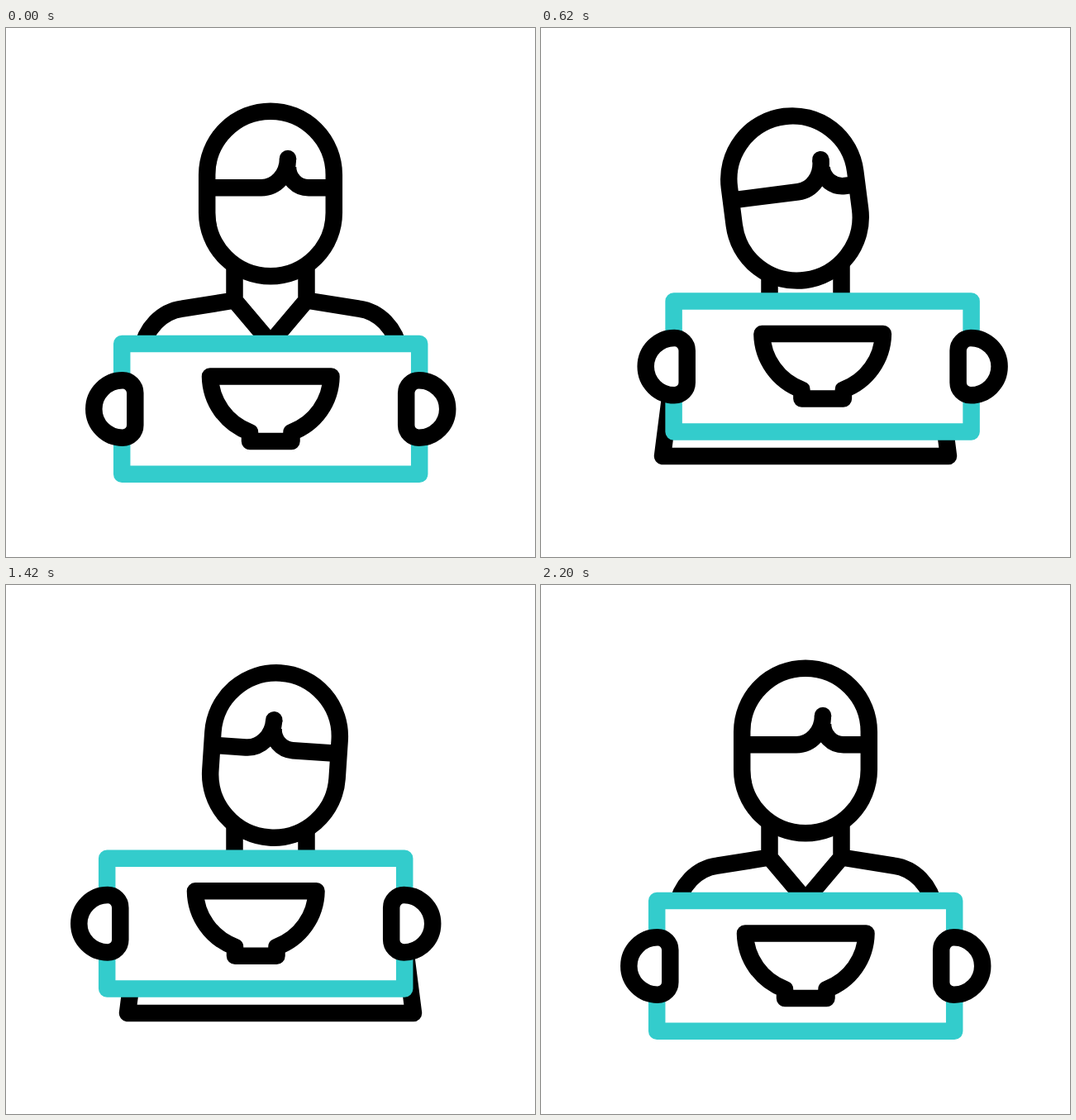
Write an HTML page that moves like this. It is 640x640 px and loops after 2400 ms.

```html
<!DOCTYPE html>
<html lang="en">
<head>
<meta charset="utf-8">
<title>Person holding a bowl sign</title>
<style>
  html, body { margin: 0; height: 100%; overflow: hidden; background: #fff; }
  svg { display: block; width: 100%; height: 100%; }
</style>
</head>
<body>
<svg viewBox="0 0 640 640" fill="#fff" stroke="#000" stroke-width="20.5" stroke-linejoin="round">
  <defs>
    <path id="hand" d="M141 426.3A34.7 34.7 0 0 0 141 495.7A15.3 15.3 0 0 0 156.3 480.4V441.6A15.3 15.3 0 0 0 141 426.3Z"/>
  </defs>

  <!-- body -->
  <path d="M276.5 329.5L213 339.7C189 343 169 362 163 393L147 518H493L477 393C471 362 451 343 427 339.7L363.5 329.5"/>
  <path d="M276.5 284V329.5L320 381L363.5 329.5V284"/>

  <g id="head">
    <rect x="243.2" y="100.7" width="153.6" height="199.6" rx="76.8"/>
    <path id="hair" fill="none"/>
    <circle id="tip" cy="158" r="10.25" fill="#000" stroke="none"/>
  </g>

  <g id="sign">
    <rect x="140.2" y="382" width="360" height="157.8" stroke="#33cccc"/>
    <use href="#hand"/>
    <use href="#hand" transform="translate(640.5) scale(-1 1)"/>
    <path d="M295 489A73.2 73.2 0 0 1 247 421.5H393.5A73.2 73.2 0 0 1 345.5 489V500H295Z"/>
  </g>
</svg>
<script>
  const [head, hair, tip, sign] = ['head', 'hair', 'tip', 'sign'].map(id => document.getElementById(id));

  // sign x, sign y, head x, head y, head angle, hair shift
  const poses = [
    [0, 0, 0, 0, 0, 0],
    [20.4, -51.4, -13, 5.5, -7.3, 16],
    [-18, -51.2, 5.5, 5.5, 3.8, -25]
  ];
  const LOOP = 2400, PART = 800, REST = 200, MOVE = 400, STEP = 20;

  const ease = u => u * u * (3 - 2 * u);

  function draw(now) {
    const t = Math.floor(now % LOOP / STEP) * STEP;
    const i = Math.floor(t / PART);
    const p = ease(Math.min(1, Math.max(0, (t % PART - REST) / MOVE)));
    const next = poses[(i + 1) % poses.length];
    const [sx, sy, hx, hy, angle, shift] = poses[i].map((v, k) => v + (next[k] - v) * p);

    sign.setAttribute('transform', `translate(${sx} ${sy})`);
    head.setAttribute('transform', `translate(${hx} ${hy}) rotate(${angle} 320 200.5)`);
    hair.setAttribute('d',
      `M243 193.3H${309 + shift}A32 35.3 0 0 0 ${341 + shift} 158` +
      `M${341 + shift} 168A25 25.3 0 0 0 ${366 + shift} 193.3H397`);
    tip.setAttribute('cx', 341 + shift);
  }

  const start = performance.now();
  function tick() {
    draw(performance.now() - start);
    requestAnimationFrame(tick);
  }
  tick();
</script>
</body>
</html>
```
